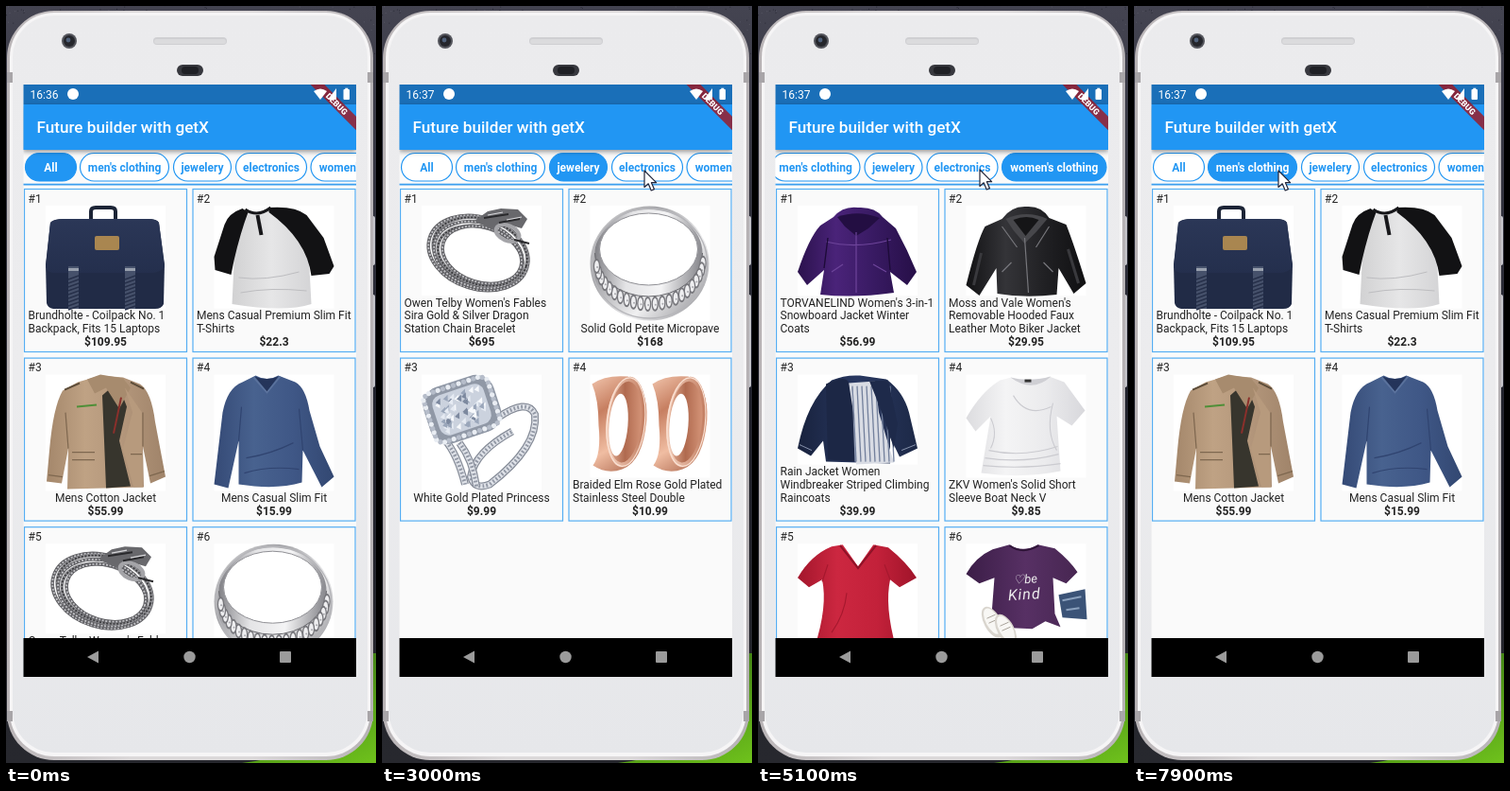
Write an HTML page with a canvas that moves like this. It is 392 by 800 pixels and loops after 8 s.

```html
<!DOCTYPE html>
<html lang="en">
<head>
<meta charset="utf-8">
<title>Future builder with getX</title>
<style>
html, body { margin: 0; width: 100%; height: 100%; overflow: hidden; background: #20222c; }
canvas { display: block; width: 392px; height: 800px; }
</style>
</head>
<body>
<canvas id="stage"></canvas>
<script>
const LOOP = 8000, BLUE = '#2196f3', W = 392, H = 800;
const canvas = document.getElementById('stage');
const ratio = window.devicePixelRatio || 1;
canvas.width = W * ratio;
canvas.height = H * ratio;
const c = canvas.getContext('2d');

// ---- helpers ----
function fill(color, d) { c.fillStyle = color; c.fill(new Path2D(d)); }
function line(color, d, w = 1) { c.strokeStyle = color; c.lineWidth = w; c.stroke(new Path2D(d)); }
function rect(color, x, y, w, h) { c.fillStyle = color; c.fillRect(x, y, w, h); }
function round(color, x, y, w, h, r) {
  c.beginPath(); c.roundRect(x, y, w, h, r); c.fillStyle = color; c.fill();
}
function oval(color, x, y, rx, ry = rx, turn = 0) {
  c.beginPath(); c.ellipse(x, y, rx, ry, turn, 0, 7); c.fillStyle = color; c.fill();
}
function loop(color, w, x, y, rx, ry, turn = 0, from = 0, to = Math.PI * 2) {
  c.beginPath(); c.ellipse(x, y, rx, ry, turn, from, to);
  c.strokeStyle = color; c.lineWidth = w; c.stroke();
}
function grad(x0, y0, x1, y1, ...colors) {
  const g = c.createLinearGradient(x0, y0, x1, y1);
  colors.forEach((col, i) => g.addColorStop(i / (colors.length - 1), col));
  return g;
}
function text(s, x, y, color = '#222', weight = 400, size = 12, align = 'left', gap = 0) {
  c.font = `${weight} ${size}px Roboto, sans-serif`;
  c.letterSpacing = gap + 'px';
  c.textAlign = align;
  c.fillStyle = color;
  c.fillText(s, x, y);
}
function random(seed) {
  return () => (seed = (seed * 16807) % 2147483647) / 2147483647;
}
function track(t, keys) {
  let a = keys[0];
  for (const b of keys) {
    if (t < b[0]) {
      if (a === b) return a.slice(1);
      const u = (t - a[0]) / (b[0] - a[0]), k = u * u * (3 - 2 * u);
      return a.slice(1).map((v, i) => v + (b[i + 1] - v) * k);
    }
    a = b;
  }
  return a.slice(1);
}

// ---- product pictures, each in a box 126 wide ----
const pics = {
  bag() {
    line('#1c2436', 'M48 16V6Q48 2 53 2H69Q74 2 74 6V16', 4);
    fill('#212b46', 'M5 18Q8 14 20 14H108Q118 14 120 18L126 62L125 104Q123 109 116 109H8Q2 108 1 103L0 62Z');
    fill(grad(0, 14, 0, 72, '#2b3757', '#242f4d'), 'M5 18Q8 14 20 14H108Q118 14 120 18L126 65Q120 71 112 71H10Q2 71 0 65Z');
    for (const x of [24, 84]) {
      rect('#46516b', x, 64, 11, 45);
      for (let y = 74; y < 108; y += 4) line('#27304a', `M${x} ${y + 4}l11 -4`, 1.5);
      rect('#98a0ae', x, 66, 11, 3);
    }
    round('#a98650', 52, 32, 26, 15, 2);
  },
  raglan() {
    fill(grad(14, 0, 108, 0, '#cfcfd0', '#e6e6e7', '#d2d2d4'),
      'M30 5Q46 12 60 3L92 8L104 34L101 66L103 104Q75 113 19 104L21 62L18 34Z');
    fill('#121214', 'M30 3Q15 8 11 20L0 54L1 68L18 73L21 58Q28 28 36 7Z');
    fill('#121214', 'M58 2Q86 0 98 10L116 34L127 64L122 72L103 74Q98 36 58 7Z');
    line('#17171a', 'M33 4Q46 13 60 2', 3);
    line('#17171a', 'M46 10L50 31', 4);
    line('#bdbdc0', 'M28 92Q60 86 98 90M26 76Q54 80 90 70', 1);
  },
  jacket() {
    fill(grad(0, 0, 126, 0, '#a3866a', '#bfa284', '#b2957a', '#a0846a'),
      'M34 8L58 1L82 3L100 10Q112 18 116 50L127 108L111 115L103 76L104 119L23 121L24 78L17 115L1 113L4 80Q8 34 18 17Z');
    fill('#37352d', 'M60 22L76 8L86 34L78 70L90 118L64 120L62 70Z');
    fill('#a78b6e', 'M44 5L58 0L82 4L90 14L78 36L64 14L52 20Z');
    fill('#b79a7d', 'M84 14L92 40L82 78L93 119H103L102 40Z');
    line('#8b2f2b', 'M80 24L75 48L72 62', 2);
    line('#4f8f38', 'M33 34L54 32', 2);
    line('#7e674f', 'M28 82H52M28 90H52M90 84H102M21 40L24 78M103 40L103 76M3 106L18 108M110 107L126 102', 1.2);
    line('#5c4c39', 'M20 16L36 9M90 8L104 15', 2);
  },
  sweater() {
    fill(grad(0, 0, 126, 0, '#354a76', '#48628f', '#3f5786', '#334872'),
      'M30 8L44 1Q56 8 68 1L86 8Q97 14 101 38L112 76L127 108L114 119L94 80L93 114Q66 122 26 116L26 70L15 120L0 116L9 40Q14 14 30 8Z');
    fill('#24345a', 'M43 2Q56 7 68 2L56 18Z');
    line('#5b739d', 'M42 3L56 19L70 2', 1.6);
    line('#304470', 'M26 70L29 34M94 80L90 36M32 104Q58 96 90 100M34 88Q60 84 84 72', 1.2);
  },
  bracelet() {
    const strands = [[60, 50, 54, 38], [62, 49, 51, 35], [60, 52, 48, 34], [62, 53, 46, 30], [64, 52, 43, 29]];
    strands.forEach(([x, y, rx, ry], i) => {
      c.setLineDash([]);
      loop(i % 2 ? '#8c8c90' : '#606064', 3.6, x, y, rx, ry, 0.3);
      c.setLineDash([2, 1.6]);
      loop(i % 2 ? '#3b3b3e' : '#c2c2c6', 1.8, x, y, rx, ry, 0.3);
    });
    c.setLineDash([]);
    fill('#68686c', 'M56 16L70 6L84 3L102 4L112 14L106 24L92 20L76 26Z');
    loop('#a4a4a8', 4, 91, 29, 13, 8, 0.4);
    line('#29292c', 'M66 13L92 9M82 18L104 14M98 36L114 40', 2);
    line('#d6d6d9', 'M70 10L86 7M90 15L106 12', 1.2);
  },
  ring() {
    oval(grad(0, 0, 126, 110, '#dededf', '#a2a2a6', '#f0f0f1', '#8f8f94'), 63, 61, 63, 60.5);
    oval(grad(6, 20, 118, 30, '#7e7e83', '#e4e4e6', '#f4f4f5', '#8e8e93'), 62, 50, 57, 46);
    oval('#fff', 62, 46, 52, 38);
    loop('#909095', 1, 62, 46, 52, 38);
    loop('#66666b', 1, 62, 50, 57, 46, 0, 0, 3.14);
    for (let a = 0.12; a < 3.04; a += 0.135) {
      const x = 63 + Math.cos(a) * 57, y = 55 + Math.sin(a) * 49;
      oval('#77777c', x, y, 3.7, 8);
      oval('#eeeef0', x, y, 2.4, 6);
      oval('#a9a9ae', x + 0.6, y + 1, 1);
    }
    loop('#b6b6ba', 1.4, 63, 61, 61, 58);
  },
  princess() {
    const bands = ['M80 46Q112 24 120 42Q124 76 72 116Q56 122 52 108Q56 82 96 60', 'M24 68Q38 84 46 116M40 72Q54 90 58 118'];
    for (const d of bands) {
      line('#878d99', d, 8);
      line('#dfe2e8', d, 5.5);
      c.setLineDash([1.8, 2.2]);
      line('#9298a5', d, 4);
      c.setLineDash([]);
    }
    c.save();
    c.translate(42, 37);
    c.rotate(-0.32);
    round('#9098a6', -38, -31, 78, 62, 20);
    const rnd = random(77);
    for (let i = 0; i < 48; i++) {
      const a = i * Math.PI / 24;
      const x = Math.max(-35, Math.min(36, Math.cos(a) * 45));
      const y = Math.max(-27, Math.min(27, Math.sin(a) * 36));
      oval(i % 2 ? '#e9edf3' : '#b6bdca', x, y, 2.6);
    }
    round('#cbd2de', -28, -22, 57, 44, 10);
    for (let i = 0; i < 60; i++) {
      const x = rnd() * 46 - 25, y = rnd() * 34 - 17;
      fill(['#f7f9fc', '#9aa6ba', '#e6ebf3', '#7d899f'][i % 4], `M${x} ${y}l6 -3l-2 7Z`);
    }
    c.restore();
  },
  tunnels() {
    for (const x of [0, 64]) {
      c.save();
      c.translate(x, 0);
      fill(grad(0, 0, 60, 100, '#f3c8b0', '#c77f61', '#f0bda2', '#a9634a'),
        'M2 10Q16 0 40 2Q62 14 60 48Q56 92 34 100Q18 106 3 96Q12 84 9 54Q9 26 2 10Z');
      oval(grad(16, 0, 60, 0, '#f7d6c4', '#c07a5d'), 38, 50, 21, 48, 0.1);
      oval(grad(18, 0, 56, 0, '#e9b79d', '#b06a4f', '#d6967a'), 37, 50, 17.5, 43, 0.1);
      oval('#fff', 30, 53, 10, 33, 0.08);
      loop('#fae0d2', 1.2, 38, 50, 20, 47, 0.1);
      c.restore();
    }
  },
  drive() {
    fill('#171719', 'M9 4Q11 0 18 0H110Q117 0 119 4L126 100Q126 109 118 109H9Q0 108 1 100Z');
    fill(grad(0, 0, 126, 108, '#353538', '#29292b', '#202022'), 'M11 5Q12 2 18 2H110Q116 2 117 5L123 97Q123 101 116 101H10Q4 101 4 97Z');
    rect('#6d6d70', 28, 6, 7, 7);
    line('#3f3f42', 'M5 99Q60 104 122 99', 1);
  },
  ssd() {
    round('#1b191b', 0, 0, 126, 109, 4);
    rect('#2a282b', 0, 4, 21, 101);
    line('#3a383b', 'M22 2V107', 1);
    fill('#3a181c', 'M0 70L21 84V107H3Z');
    rect('#e8e8e8', 69, 20, 5, 5);
    text('SSD RISE', 66, 35, '#fff', 'italic 900', 11, 'center');
    text('Solid State Drive', 66, 52, '#ddd', 400, 6, 'center', 0.3);
    rect('#d5232b', 55, 69, 24, 24);
  },
  chipSsd() {
    round('#111215', 0, 0, 127, 81, 5);
    for (let i = 0; i < 9; i++) for (let j = 0; j < 7; j++) {
      const x = 6 + i * 6 + (j % 2) * 3, y = 18 + j * 6;
      fill((i + j) % 3 ? '#17424a' : '#3b83a0', `M${x} ${y}l5 0l-2.5 5Z`);
    }
    oval('#e9e9ea', 73, 32, 9);
    text('Solid State Drive', 64, 58, '#bbb', 400, 6);
    for (let x = 7; x < 78; x += 9) loop('#c9c9c9', 1, x, 74, 2.8, 2.8);
    round('#e5e5e5', 82, 67, 17, 12, 2);
    text('256', 90.5, 77, '#111', 700, 9, 'center');
  },
  gaming() {
    fill('#2f6fc0', 'M2 8Q2 2 9 2H30V91H10Q5 90 4 82Z');
    fill('#17181b', 'M9 9Q10 2 18 2H112Q119 2 120 8L126 84Q126 93 118 93H17Q10 92 10 84Z');
    fill(grad(10, 0, 126, 90, '#34363b', '#222327', '#2c2d31'), 'M11 9Q12 2 18 2H111Q117 2 118 8L123 81Q122 86 116 86H18Q12 86 12 80Z');
    for (let i = 0; i < 11; i++) line('#3b3d42', `M${16 + i * 9} 5l9 78`, 0.6);
    rect('#8b8c90', 69, 44, 6, 6);
  },
  monitor() {
    rect('#141416', 0, 1, 127, 83);
    rect(grad(0, 3, 0, 40, '#6d8dc0', '#dcb0a0', '#f0b270'), 2, 3, 123, 38);
    oval('#ffe9b0', 71, 25, 8);
    fill('#4b4a61', 'M2 28L20 18L40 28L56 24L84 32L104 18L125 27V44H2Z');
    fill('#4d7d2c', 'M2 36Q40 28 76 40L125 32V79H2Z');
    fill('#a9b7c4', 'M62 38Q50 50 34 54Q64 60 48 79H90Q76 58 84 48Z');
    fill('#365b21', 'M2 54Q22 50 34 64L44 79H2ZM92 79Q98 54 125 50V79Z');
    for (let i = 0; i < 12; i++) oval(i % 2 ? '#a23d59' : '#d06f83', 6 + (i * 29) % 40, 58 + (i * 7) % 19, 2);
    rect('#17171a', 53, 84, 20, 7);
    oval('#1e1e21', 63, 92, 22, 3);
  },
  curved() {
    fill('#151518', 'M0 1Q58 14 126 0L127 62Q64 58 5 74Z');
    fill(grad(0, 0, 126, 0, '#2e3236', '#08090b', '#17191d'), 'M3 5Q58 17 124 4L124 57Q62 54 8 69Z');
    fill('#555b60', 'M25 55L28 36Q24 27 31 20Q40 21 40 31L48 39L54 53Z');
    ['VIVID', 'GAMING', 'MONITOR'].forEach((s, i) => text(s, 79, 25 + i * 9, '#eee', 700, 8));
    line('#b9bbc0', 'M64 61L62 73M34 78L63 72L116 75', 3);
  },
  snow() {
    fill(grad(0, 0, 122, 0, '#2b124d', '#4a2379', '#381a62', '#28104a'),
      'M38 12Q48 0 64 2Q82 1 90 12L104 24Q116 46 126 70L116 84L98 70L102 92Q60 98 24 94L28 68L10 84L0 70Q12 34 24 21Z');
    fill('#230e42', 'M42 12Q64 4 87 13L75 24L62 32L50 22Z');
    line('#6d449a', 'M62 28V92M30 38Q62 46 99 36M36 70L48 62M80 62L94 70', 1.2);
    line('#1d0b38', 'M28 66L32 34M98 68L95 34', 1.4);
  },
  leather() {
    fill(grad(0, 0, 126, 0, '#121214', '#343438', '#202023', '#101012'),
      'M38 14Q48 0 64 1Q80 0 88 13L106 20Q114 40 127 82L114 93L98 66L96 94Q62 98 33 93L32 66L14 95L0 84Q12 36 20 22Z');
    fill('#47474b', 'M42 14Q64 4 86 14L74 28L62 40L50 26Z');
    fill('#151517', 'M50 15Q64 9 77 15L63 32Z');
    line('#77777c', 'M62 34L66 92M38 22L54 44M88 22L74 44M38 70L48 60M82 60L92 70', 1.2);
    line('#39393d', 'M16 50L8 84M108 46L119 82', 3);
  },
  rain() {
    fill(grad(0, 0, 126, 0, '#18223d', '#293861', '#1d2947'),
      'M36 6Q50 0 66 1L94 5Q112 18 118 40L127 78L108 87L98 66L98 94L30 92L27 70L14 86L0 78Q10 28 36 6Z');
    fill('#d9dce4', 'M54 9L82 7L86 40L102 93L62 95L58 54Z');
    for (let x = 58; x < 100; x += 5) line('#73809c', `M${x} 12L${x + 4} 92`, 1.3);
    fill('#1c2745', 'M30 10Q50 0 54 8L60 46L60 92L32 90Z');
    fill('#1e2a4a', 'M76 7L96 6L106 52L102 78Q90 40 76 7Z');
    line('#8792ac', 'M58 14L61 92M2 74L15 80M110 80L125 74', 1);
  },
  top() {
    fill(grad(0, 0, 126, 0, '#dcdcdf', '#f4f4f5', '#ebebed', '#d8d8dc'),
      'M36 6L48 3Q68 14 88 2L104 8L126 38L112 54L96 44L100 102Q60 110 16 104L26 44L10 60L0 46Q16 18 36 6Z');
    fill('#cfcfd4', 'M47 3Q66 8 90 2Q70 20 47 3Z');
    rect('#333', 62, 5, 7, 3);
    line('#cbcbd0', 'M26 46Q34 62 26 78M92 30Q84 60 96 80M20 88Q60 94 98 84M18 96Q60 100 100 94M24 80Q60 88 97 76M50 22Q64 46 90 34', 1.1);
  },
  red() {
    fill(grad(0, 0, 126, 0, '#a3162c', '#cc2740', '#c3213a', '#a0142a'),
      'M36 3L48 1Q64 6 80 1L96 4Q116 20 126 36L108 46L98 38Q92 66 104 109H18Q32 66 26 38L12 46L0 36Q14 12 36 3Z');
    fill('#fff', 'M47 0Q64 4 81 0L64 24Z');
    line('#8f1227', 'M45 2L64 26L83 2', 2);
    line('#a6182e', 'M26 40L32 22M98 38L92 22M36 94Q50 74 52 52', 1.2);
  },
  kind() {
    fill(grad(0, 0, 126, 0, '#3b1d47', '#573064', '#45254f'),
      'M28 6L46 1Q60 10 76 1L94 5Q110 18 118 30L106 42L92 36L94 74L100 88L84 82L70 90L26 88L30 36L14 42L0 32Q10 14 28 6Z');
    line('#2f1538', 'M46 2Q60 12 77 2', 2);
    c.save();
    c.translate(61, 42);
    c.rotate(-0.06);
    text('♡be', 2, 0, '#eee', 'italic 400', 13, 'center');
    text('Kind', 0, 17, '#eee', 'italic 400', 16, 'center', 1);
    c.restore();
    fill('#3b5377', 'M98 54L126 48L128 80L102 78Z');
    line('#8aa0bd', 'M102 60L122 56M106 70L120 68', 2);
    for (const [x, y] of [[28, 83], [42, 91]]) {
      oval('#d9d5ce', x, y, 9, 18, -0.5);
      oval('#f8f7f4', x, y - 1, 7, 15, -0.5);
      line('#a9a39a', `M${x - 6} ${y - 4}l9 -4M${x - 4} ${y + 1}l9 -4`, 1);
    }
  }
};

// ---- lists: picture, price, title lines ----
const mens = [
  ['bag', '$109.95', 'Brundholte - Coilpack No. 1', 'Backpack, Fits 15 Laptops'],
  ['raglan', '$22.3', 'Mens Casual Premium Slim Fit', 'T-Shirts'],
  ['jacket', '$55.99', 'Mens Cotton Jacket'],
  ['sweater', '$15.99', 'Mens Casual Slim Fit']
];
const jewels = [
  ['bracelet', '$695', "Owen Telby Women's Fables", 'Sira Gold & Silver Dragon', 'Station Chain Bracelet'],
  ['ring', '$168', 'Solid Gold Petite Micropave'],
  ['princess', '$9.99', 'White Gold Plated Princess'],
  ['tunnels', '$10.99', 'Braided Elm Rose Gold Plated', 'Stainless Steel Double']
];
const electronics = [
  ['drive', '$64', 'VQ 2TB Particles Portable', 'External Hard Drive - USB 3.0'],
  ['ssd', '$109', 'Tarvolk SSD RISE 1TB', 'Internal SSD - SATA III 6 Gb/s'],
  ['chipSsd', '$109', 'Marlow Quartz 256GB SSD 3D', 'NAND K38 SLC Cache', 'Performance Boost SATA III', '2.5'],
  ['gaming', '$114', 'VQ 4TB Gaming Drive Works', 'with Joltbureau 4 Portable', 'External Hard Drive'],
  ['monitor', '$599', 'Orbo TK410M bi 21.5 inches', 'Full HD Widescreen', 'Monitor'],
  ['curved', '$999', 'Velmora 49-Inch TRX70', '144Hz Curved Gaming Monitor', 'Super Ultrawide Screen', 'Display']
];
const womens = [
  ['snow', '$56.99', "TORVANELIND Women's 3-in-1", 'Snowboard Jacket Winter', 'Coats'],
  ['leather', '$29.95', "Moss and Vale Women's", 'Removable Hooded Faux', 'Leather Moto Biker Jacket'],
  ['rain', '$39.99', 'Rain Jacket Women', 'Windbreaker Striped Climbing', 'Raincoats'],
  ['top', '$9.85', "ZKV Women's Solid Short", 'Sleeve Boat Neck V'],
  ['red', '$7.95', "Women's Short Sleeve", 'Moisture Shirt'],
  ['kind', '$12.99', 'Womens T Shirt', 'Casual Cotton Short']
];
const chips = [
  ['All', 20, 55, [...mens, ...jewels.slice(0, 2)]],
  ["men's clothing", 78, 95, mens],
  ['jewelery', 177, 62, jewels],
  ['electronics', 243, 76, electronics],
  ["women's clothing", 322.5, 111.5, womens]
];

// ---- timeline ----
const taps = [[-999, 0], [1500, 1], [2350, 2], [3150, 3], [4550, 4], [6600, 2], [7600, 1]];
const pointer = [
  [200, 405, 340], [800, 50, 173], [1050, 50, 173], [1450, 125, 174], [1650, 125, 174],
  [2100, 205, 173], [2550, 205, 173], [3000, 278, 174], [3300, 278, 174], [3800, 357, 179],
  [3900, 357, 179], [4250, 292, 178], [4500, 312, 175], [4650, 312, 175], [5100, 235, 173],
  [5200, 235, 173], [5650, 300, 172], [5800, 300, 172], [6400, 202, 170], [7000, 202, 170], [7500, 153, 174]
];
const drag = [[3900, 0], [4250, 64.5], [5200, 64.5], [5650, 0]];

function mix(k) {
  const ch = (a) => Math.round(a + (255 - a) * k);
  return `rgb(${ch(33)},${ch(150)},${ch(243)})`;
}

function drawPhone() {
  rect(grad(0, 0, 0, H, '#444451', '#22232d', '#27282e'), 0, 0, W, H);
  const rnd = random(9);
  for (let i = 0; i < 260; i++) rect(i % 2 ? '#565663' : '#2b2c37', rnd() * W, rnd() * 50, 1, 1);
  fill(grad(340, 690, 392, 800, '#3f7d16', '#6fc21c'), 'M392 684V800H250Q350 790 384 684Z');
  round('#c6c6cb', 386, 222, 5, 52, 2);
  round('#c6c6cb', 386, 305, 5, 98, 2);
  round(grad(0, 0, W, 0, '#b9b4b6', '#dcd9da', '#dcd9da', '#b5b1b4'), 1, 5, 388, 792, 50);
  round('#f6f5f6', 4, 7, 382, 786, 47);
  round(grad(0, 8, 0, 790, '#ebebed', '#ececee', '#e6e7ea'), 7, 10, 376, 779, 44);
  for (const y of [70, 745]) {
    rect('#a8a5a8', 1, y, 6, 11);
    rect('#a8a5a8', 383, y, 6, 11);
  }
  oval('#55565d', 67, 37, 8);
  oval('#25262c', 67, 37, 6);
  oval('#50617a', 66, 36, 2.4);
  round('#cfcfd2', 156, 33, 78, 8, 4);
  round('#dbdbdd', 157, 35, 76, 5, 3);
  round('#37383e', 181, 62, 28, 12, 6);
  round('#1f2025', 186, 64, 18, 8, 4);
}

function drawCard(item, i) {
  const [pic, price, ...lines] = item;
  const x = i % 2 ? 197.5 : 19, y = 193 + (i >> 1) * 178.6;
  c.strokeStyle = '#55aef3';
  c.lineWidth = 1.2;
  c.strokeRect(x + 0.5, y + 0.5, 172, 172);
  text('#' + (i + 1), x + 4.5, y + 14.5);
  const h = 136.5 - 13.8 * lines.length;
  rect('#fff', x + 23, y + 18, 127, h);
  c.save();
  c.translate(x + 23, y + 18);
  pics[pic]();
  c.restore();
  lines.forEach((s, n) => {
    const base = y + 166 - 13.8 * (lines.length - n);
    if (lines.length === 1) text(s, x + 86.5, base, '#222', 400, 12, 'center');
    else text(s, x + 4.5, base);
  });
  text(price, x + 86.5, y + 166, '#222', 700, 12, 'center');
}

function drawChips(t, on, was, since) {
  const [scroll] = track(t, drag), k = Math.min(1, since / 200);
  chips.forEach(([label, x, w], i) => {
    const left = x - scroll;
    const fade = i === on ? k : i === was ? 1 - k : 0;
    c.beginPath();
    c.roundRect(left + 0.5, 155.5, w - 1, 29.5, 14.75);
    c.fillStyle = i === on ? BLUE : '#fff';
    c.fill();
    c.strokeStyle = i === on ? BLUE : mix(fade);
    c.lineWidth = 1.2;
    c.stroke();
    text(label, left + w / 2, 174.5, mix(fade), 700, 12, 'center');
  });
}

function drawBars(t) {
  rect('#1a6fb8', 18, 83, 353, 21);
  text(t < 450 ? '16:36' : '16:37', 25.5, 97.5, '#fff', 400, 12);
  oval('#fff', 71, 93, 6);
  c.save();
  c.shadowColor = 'rgba(0,0,0,.4)';
  c.shadowBlur = 5;
  c.shadowOffsetY = 2;
  rect(BLUE, 18, 104, 353, 48);
  c.restore();
  text('Future builder with getX', 32.5, 134, '#fff', 500, 17.14);

  c.save();
  c.translate(350.5, 103.5);
  c.rotate(Math.PI / 4);
  rect('rgba(160,22,32,.8)', -50, -5.2, 100, 10.4);
  text('DEBUG', 0, 3.2, '#fff', 900, 8.8, 'center');
  c.restore();

  fill('#fff', 'M326 90Q333 85 340 90L333 99Z');
  fill('#fff', 'M350 87V99H341Z');
  round('#fff', 357.5, 88, 6.5, 11, 1);
  rect('#fff', 359.3, 86.7, 3, 2);
}

function drawNav() {
  rect('#000', 18, 668, 353, 41);
  fill('#9b9b9b', 'M86 688L98 681.5V694.5Z');
  oval('#9b9b9b', 194.5, 688, 6.2);
  round('#9b9b9b', 290, 682, 12, 12, 1);
}

function draw(t) {
  c.setTransform(ratio, 0, 0, ratio, 0, 0);
  drawPhone();
  const n = taps.findLastIndex((tap) => tap[0] <= t);
  const on = taps[n][1], was = n ? taps[n - 1][1] : -1;

  c.save();
  c.beginPath();
  c.rect(18.5, 83, 352.5, 626);
  c.clip();
  rect('#fafafa', 18, 83, 353, 626);
  chips[on][3].forEach(drawCard);
  drawChips(t, on, was, t - taps[n][0]);
  rect('#3c9fee', 18, 187.7, 353, 1.8);
  drawBars(t);
  drawNav();
  c.restore();

  if (t > 200) {
    const [x, y] = track(t, pointer);
    c.save();
    c.translate(x, y);
    c.lineJoin = 'round';
    const arrow = 'M0 0V17.5L4.2 13.8L7.2 21L10.4 19.6L7.4 12.7H12.6Z';
    fill('#fff', arrow);
    line('#23263a', arrow, 1.2);
    c.restore();
  }
}

function tick() {
  draw(performance.now() % LOOP);
  requestAnimationFrame(tick);
}
tick();
</script>
</body>
</html>
```
